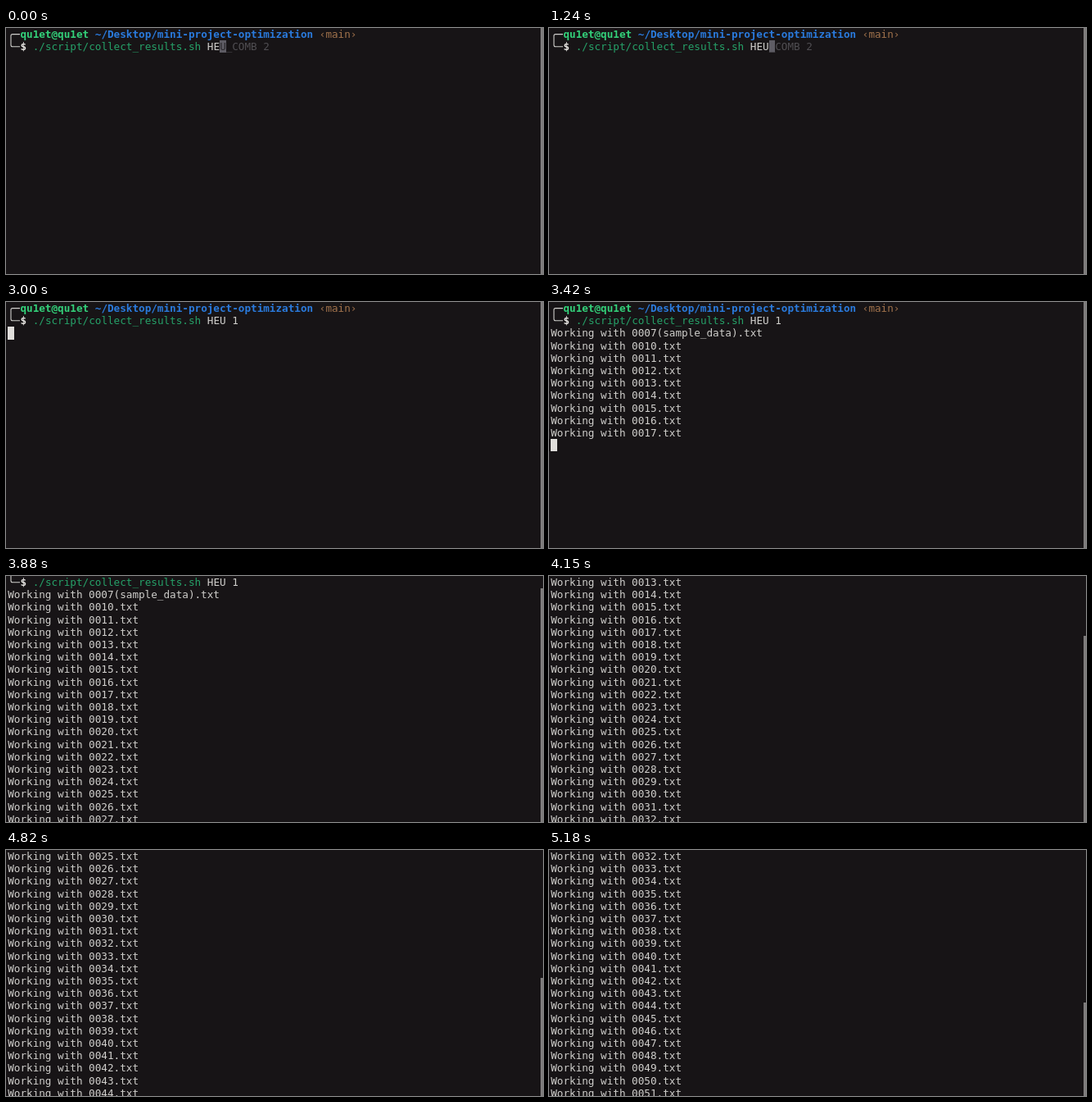
Recreate the animation shown at these times as an HTML page. Size 656 by 300 pixels, loop 5.21 s.

```html
<!DOCTYPE html>
<html lang="en">
<head>
<meta charset="utf-8">
<title>Terminal</title>
<style>
  html, body { margin: 0; width: 100%; height: 100%; overflow: hidden; background: #171416; }
  #stage { position: relative; width: 656px; height: 300px; overflow: hidden; background: #171416; }
  #screen { position: absolute; left: 2.2px; top: 0; color: #d0cfcc;
    font: 12.657px/15.2px "DejaVu Sans Mono", monospace; font-variant-ligatures: none; }
  .row { position: absolute; left: 0; height: 15.2px; white-space: pre; }
  svg { position: absolute; left: 0; top: 0; fill: none; stroke: #d0cfcc; stroke-width: 1.1; }
  b { color: #e4e2df; }
  .user { color: #33d17a; }
  .path { color: #2a7bde; }
  .branch { color: #a2734c; }
  .cmd { color: #26a269; }
  .hint { color: #504e52; }
  #cursor { width: 7.62px; color: #2a282b; }
  #bar { position: absolute; left: 653px; width: 3px; bottom: 0; background: #7d7b7b; }
</style>
</head>
<body>
<div id="stage">
  <div id="screen">
    <svg width="16" height="31"><path d="M15 7.6H6Q4 7.6 4 9.6V20.8Q4 22.8 6 22.8H15"/></svg>
    <div class="row" style="top:0">  <b class="user">qu1et@qu1et</b> <b class="path">~/Desktop/mini-project-optimization</b> <span class="branch">‹main›</span></div>
    <div class="row" style="top:15.2px">  <b>$</b> <span class="cmd">./script/collect_results.sh</span> <span id="typed"></span><span id="hint" class="hint"></span></div>
    <div id="cursor" class="row"></div>
  </div>
  <div id="bar"></div>
</div>
<script>
const LOOP = 5210, LINE = 15.2, CELL = 7.62, ROWS = 24, FILES = 47;
const ARG_COL = 32, ENTER = 2850;
const $ = id => document.getElementById(id);
const screen_ = $('screen'), cursor = $('cursor');

// [time, typed text, suggestion]
const keys = [
  [0, 'HE', 'U_COMB 2'],
  [760, 'HEU', '_COMB 2'],
  [1360, 'HEU ', ''],
  [1760, 'HEU 1', '']
];
// spans in which the cursor is blinked off
const blinks = [[550, 760], [1000, 1240], [1520, 1700], [2240, 2520]];

// Output runs faster until the screen begins to scroll.
const printedAt = n => 3875 + (n - 22) * (n < 22 ? 37.3 : 54);

const files = Array.from({ length: FILES }, (_, i) => {
  const row = document.createElement('div');
  const name = i ? String(i + 9).padStart(4, '0') : '0007(sample_data)';
  row.className = 'row';
  row.style.top = (i + 2) * LINE + 'px';
  row.textContent = `Working with ${name}.txt`;
  screen_.append(row);
  return row;
});

function draw(t) {
  const [, typed, hint] = keys.filter(k => k[0] <= t).pop();
  $('typed').textContent = typed;
  $('hint').textContent = hint;

  let count = 0;
  files.forEach((row, i) => {
    const shown = t >= printedAt(i + 1);
    row.style.visibility = shown ? 'visible' : 'hidden';
    count += shown;
  });

  const running = t >= ENTER;
  const line = running ? count + 2 : 1;
  const col = running ? 0 : ARG_COL + typed.length;
  const off = blinks.some(([a, b]) => t >= a && t < b);
  cursor.style.left = col * CELL + 'px';
  cursor.style.top = line * LINE + 'px';
  cursor.style.background = hint ? '#5e5c64' : '#e0dedb';
  cursor.style.visibility = off ? 'hidden' : 'visible';
  cursor.textContent = hint.charAt(0);

  const scroll = Math.max(0, line - ROWS + 1);
  screen_.style.top = -scroll * LINE + 'px';
  $('bar').style.top = ROWS * LINE * scroll / (scroll + ROWS) + 'px';
}

const start = performance.now();
function tick() {
  draw((performance.now() - start) % LOOP);
  requestAnimationFrame(tick);
}
tick();
</script>
</body>
</html>
```
